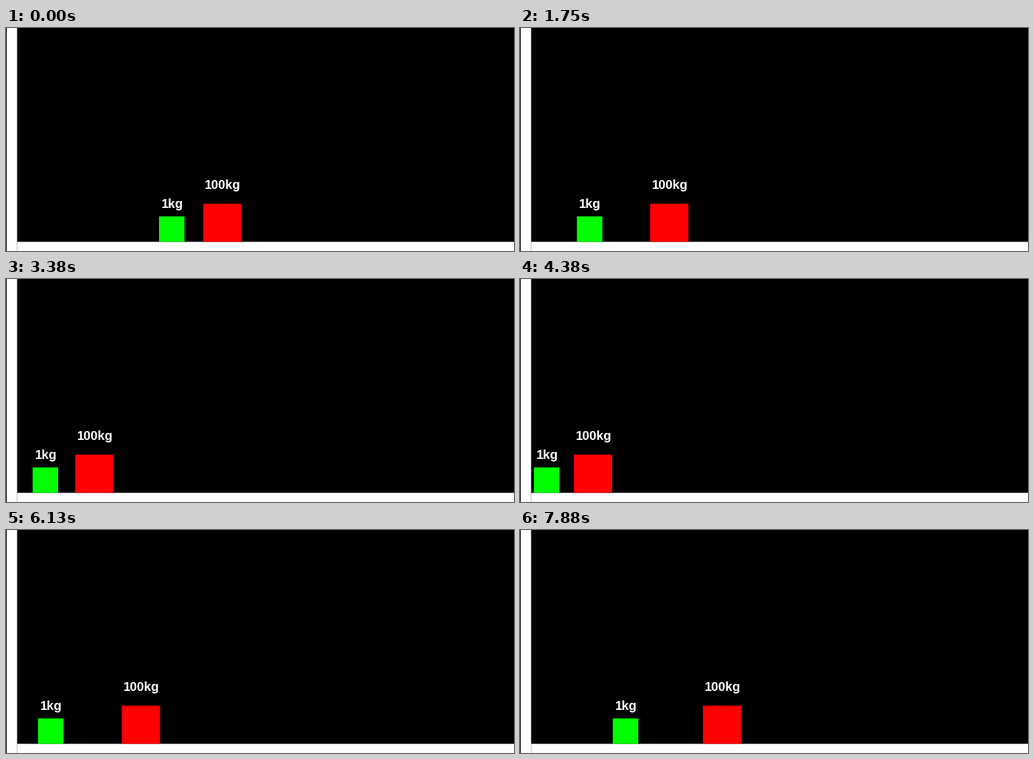
A matplotlib script that plays this animation: 800x352 px, repeating every 8 s.

```python
import numpy as np
import matplotlib.pyplot as plt
from matplotlib.animation import FuncAnimation
from matplotlib.patches import Rectangle

W, H, DPI = 800, 352, 100
FRAMES, INTERVAL = 64, 125

WALL, FLOOR = 17.5, 337.5
SMALL, BIG, GAP = 40.1, 60.2, 0.6   # block sides, clearance at a hit
REST = 241                          # small block before the first hit
OFFSET = 220                        # distance of the unfolded path from the corner
START, SPEED = 2523.5, 76.45        # along that path, per frame
RATIO = 10                          # square root of the mass ratio
WEDGE = np.arctan(1 / RATIO)


def positions(i):
    """Left edges of both blocks: elastic hits as a straight line folded in a wedge."""
    x = START - SPEED * i
    r, angle = np.hypot(x, OFFSET), np.arctan2(OFFSET, x)
    folded = angle % (2 * WEDGE)
    folded = min(folded, 2 * WEDGE - folded)
    small = REST if angle < WEDGE else WALL + r * np.sin(folded)
    big = WALL + SMALL + GAP + r * np.cos(folded) / RATIO
    return small, big


fig = plt.figure(figsize=(W / DPI, H / DPI), dpi=DPI, facecolor="black")
ax = fig.add_axes([0, 0, 1, 1])
ax.set_xlim(0, W)
ax.set_ylim(H, 0)
ax.axis("off")


def rect(x, y, w, h, color, z=1):
    return ax.add_patch(Rectangle((x, y), w, h, fc=color, lw=0, zorder=z, snap=False))


def block(side, color, label):
    top = FLOOR - side
    body = rect(0, top, side, side, color, 2)
    text = ax.text(0, top - side / 2 + 6.5, label, color="white", ha="center",
                   va="baseline", family="Liberation Sans", weight="bold",
                   size=20 * 72 / DPI, zorder=3)
    return body, text


rect(1.2, 0, WALL - 1.2, H, "#fdfdfd")
rect(WALL, FLOOR, W - WALL, H - FLOOR, "#fdfdfd")
blocks = [block(SMALL, "#00ff00", "1kg"), block(BIG, "#ff0000", "100kg")]


def update(i):
    for (body, text), x in zip(blocks, positions(i)):
        body.set_x(x)
        text.set_x(x + body.get_width() / 2 + 0.7)
    return [artist for pair in blocks for artist in pair]


anim = FuncAnimation(fig, update, frames=FRAMES, interval=INTERVAL,
                     repeat=True, repeat_delay=0, blit=False)
plt.show()
```
